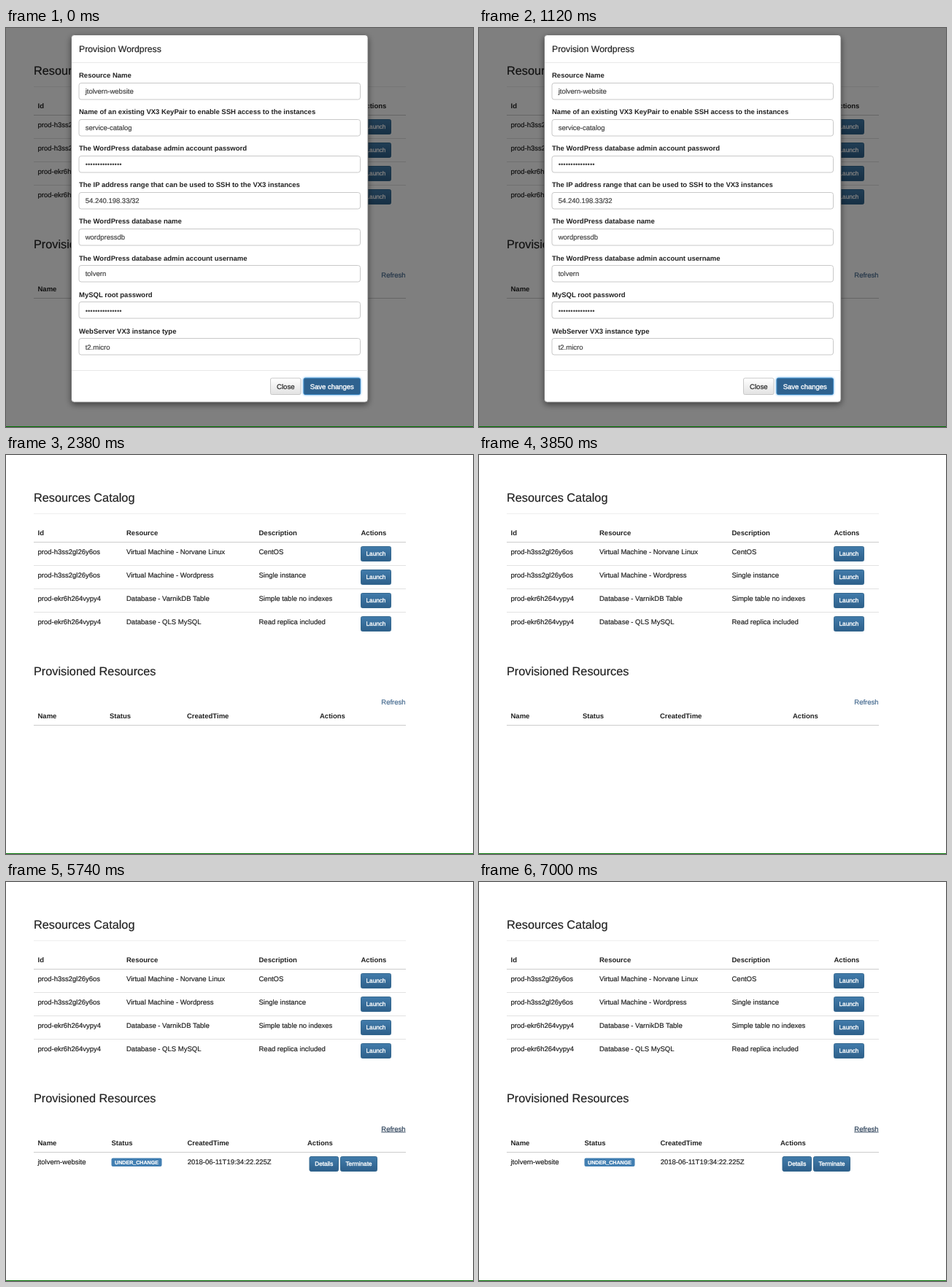
An HTML page for the animation above (7070 ms loop, 640 by 547 pixels).

```html
<!DOCTYPE html>
<html lang="en">
<head>
<meta charset="utf-8">
<title>Resources Catalog</title>
<style>
html, body { margin: 0; width: 100%; height: 100%; overflow: hidden; background: #fff; }
svg { display: block; width: 640px; height: 547px; font-family: "Liberation Sans", Arial, sans-serif; text-rendering: geometricPrecision; }
</style>
</head>
<body>
<svg id="stage" viewBox="0 0 640 547">
  <defs>
    <linearGradient id="blue" x2="0" y2="1"><stop stop-color="#427cab"/><stop offset="1" stop-color="#2d5f8a"/></linearGradient>
    <linearGradient id="pale" x2="0" y2="1"><stop stop-color="#fff"/><stop offset="1" stop-color="#e2e2e2"/></linearGradient>
    <filter id="shadow" x="-10%" y="-10%" width="120%" height="120%"><feDropShadow dx="0" dy="3" stdDeviation="4.5" flood-opacity=".5"/></filter>
    <filter id="glow" x="-20%" y="-40%" width="140%" height="180%"><feDropShadow dx="0" dy="0" stdDeviation="1.6" flood-color="#55a5e8"/></filter>
  </defs>
</svg>
<script>
const LOOP = 7070, CLOSE = 2380, HOVER = 4130, LOADED = 5250;
const stage = document.getElementById('stage');

function add(parent, tag, attrs, content) {
  const el = document.createElementNS('http://www.w3.org/2000/svg', tag);
  for (const k in attrs) el.setAttribute(k, attrs[k]);
  if (content) el.textContent = content;
  parent.append(el);
  return el;
}
const group = parent => add(parent, 'g', {});

// y is the vertical middle of the capitals; a hairline stroke gives the heavier text weight
const text = (g, x, y, s, size = 9.5, { fill = '#222', ...more } = {}) =>
  add(g, 'text', { x, y: y + size * .36, 'font-size': size, fill, stroke: fill, 'stroke-width': .2, ...more }, s);
const bold = (g, x, y, s) => text(g, x, y, s, 9.5, { 'font-weight': 700, 'stroke-width': 0 });
const rect = (g, x, y, width, height, fill, more = {}) =>
  add(g, 'rect', { x, y, width, height, fill, ...more });
const rule = (g, y, fill, x = 38, w = 510) => rect(g, x, y, w, 1, fill);

function button(g, x, y, w, h, label, size = 8.2, kind = 'blue', more = {}) {
  const blue = kind === 'blue';
  rect(g, x + .5, y + .5, w - 1, h - 1, `url(#${kind})`, { rx: 2, stroke: blue ? '#35688f' : '#c8c8c8', ...more });
  text(g, x + w / 2, y + h / 2, label, size, {
    'text-anchor': 'middle', fill: blue ? '#fff' : '#222', 'stroke-width': blue ? .35 : .2
  });
}

const headings = (g, y, cols) => cols.forEach(([x, s]) => bold(g, x, y, s));

// Catalog
const page = group(stage);
text(page, 38, 58.3, 'Resources Catalog', 16.3);
rule(page, 80, '#eee');
headings(page, 106.5, [[43.5, 'Id'], [165, 'Resource'], [346.5, 'Description'], [486.5, 'Actions']]);
[
  ['prod-h3ss2gl26y6os', 'Virtual Machine - Norvane Linux', 'CentOS'],
  ['prod-h3ss2gl26y6os', 'Virtual Machine - Wordpress', 'Single instance'],
  ['prod-ekr6h264vypy4', 'Database - VarnikDB Table', 'Simple table no indexes'],
  ['prod-ekr6h264vypy4', 'Database - QLS MySQL', 'Read replica included']
].forEach((row, i) => {
  const y = 119 + i * 32;
  rule(page, y, i ? '#e2e2e2' : '#ccc');
  [43.5, 165, 346.5].forEach((x, c) => text(page, x, y + 13.2, row[c]));
  button(page, 486, y + 6, 42, 21, 'Launch');
});

// Provisioned resources
text(page, 38, 296.3, 'Provisioned Resources', 16.3);
const refresh = text(page, 514.3, 338.7, 'Refresh');
const underline = rect(page, 514.3, 342.5, 33.3, .9, '#2a3f57');
rule(page, 370, '#ccc');

const empty = group(page);
headings(empty, 357.8, [[43.5, 'Name'], [142, 'Status'], [248, 'CreatedTime'], [430, 'Actions']]);

const loaded = group(page);
headings(loaded, 357.8, [[43.5, 'Name'], [144.5, 'Status'], [248.5, 'CreatedTime'], [413, 'Actions']]);
text(loaded, 43.5, 383.5, 'jtolvern-website');
rect(loaded, 144.5, 378.5, 69, 11.5, '#427fb2', { rx: 2 });
text(loaded, 179, 384.2, 'UNDER_CHANGE', 7.1, { 'font-weight': 700, fill: '#fff', 'text-anchor': 'middle' });
text(loaded, 248.7, 383.5, '2018-06-11T19:34:22.225Z');
button(loaded, 415.5, 376, 40.5, 21, 'Details');
button(loaded, 458, 376, 51, 21, 'Terminate');

// Dialog
const dialog = group(stage);
rect(dialog, 0, 0, 640, 547, '#000', { opacity: .5 });
rect(dialog, 89.5, 9.5, 406.5, 503.5, '#fff', { rx: 4, stroke: '#666', 'stroke-width': .8, filter: 'url(#shadow)' });
text(dialog, 100, 28.5, 'Provision Wordpress', 12.25);
rule(dialog, 47, '#e8e8e8', 90, 405.5);
const dots = '•'.repeat(15);
[
  ['Resource Name', 'jtolvern-website'],
  ['Name of an existing VX3 KeyPair to enable SSH access to the instances', 'service-catalog'],
  ['The WordPress database admin account password', dots],
  ['The IP address range that can be used to SSH to the VX3 instances', '54.240.198.33/32'],
  ['The WordPress database name', 'wordpressdb'],
  ['The WordPress database admin account username', 'tolvern'],
  ['MySQL root password', dots],
  ['WebServer VX3 instance type', 't2.micro']
].forEach(([label, value], i) => {
  const y = 64.5 + i * 50.14;
  bold(dialog, 100, y, label);
  rect(dialog, 100, Math.round(y + 10) + .5, 385.5, 22.5, '#fff', { rx: 3, stroke: '#c8c8c8' });
  text(dialog, 108.7, y + 21.8, value, 9.5, { fill: '#444', 'stroke-width': value === dots ? 0 : .2 });
});
rule(dialog, 469, '#e8e8e8', 90, 405.5);
button(dialog, 362, 479.5, 42.5, 23.5, 'Close', 9.6, 'pale');
button(dialog, 407.5, 479.5, 78.5, 23.5, 'Save changes', 9.5, 'blue', { fill: '#2e628f', stroke: '#3c86c0', filter: 'url(#glow)' });

rect(stage, 0, 546, 640, 1, '#007000');

const show = (el, on) => el.setAttribute('visibility', on ? 'visible' : 'hidden');
const start = performance.now();

function draw(now) {
  const t = Math.max(0, now - start) % LOOP;
  const link = t < HOVER ? '#456a8f' : '#2a3f57';
  show(dialog, t < CLOSE);
  show(underline, t >= HOVER);
  refresh.setAttribute('fill', link);
  refresh.setAttribute('stroke', link);
  show(empty, t < LOADED);
  show(loaded, t >= LOADED);
  requestAnimationFrame(draw);
}
draw(start);
</script>
</body>
</html>
```
